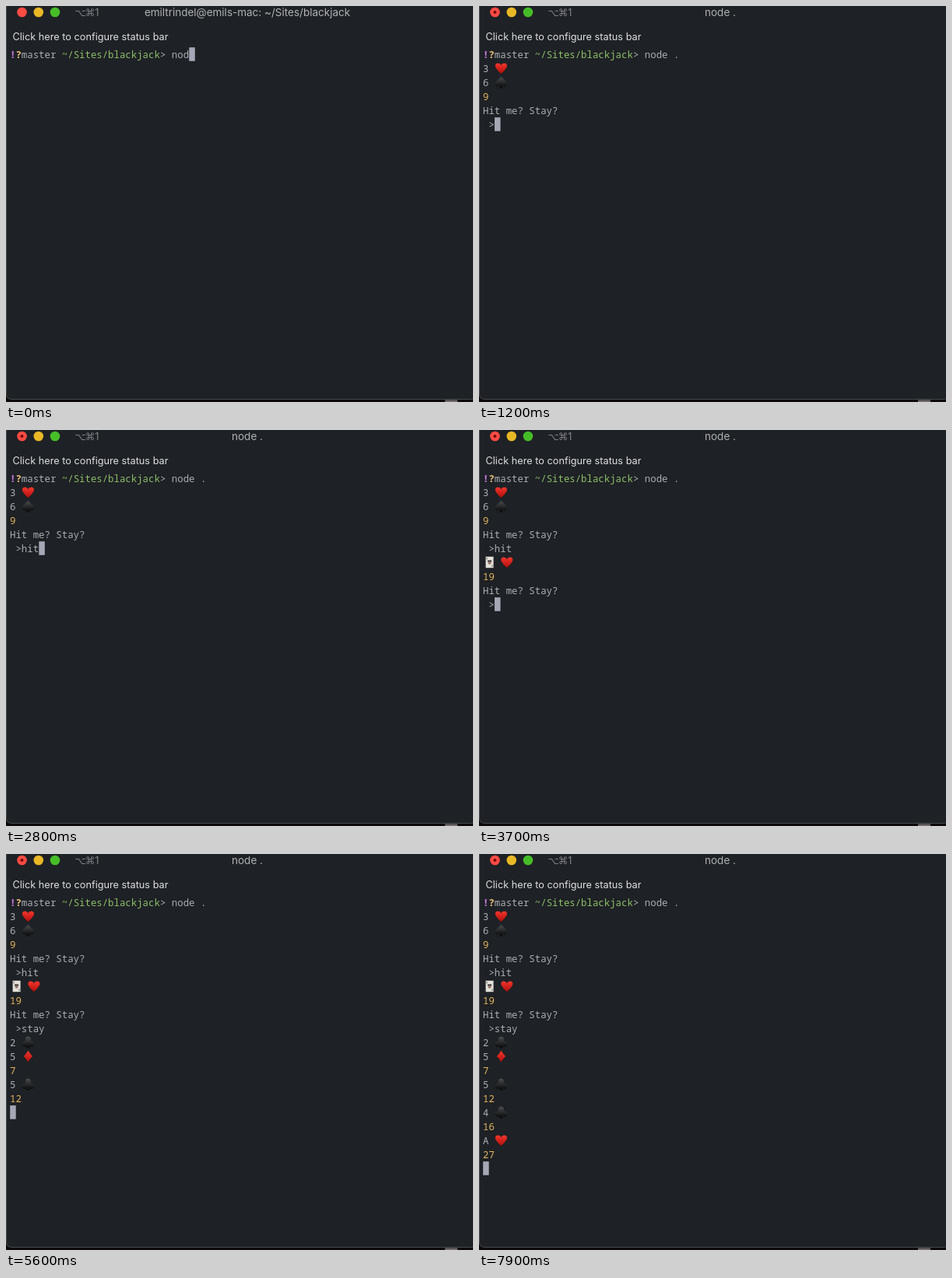
Write an HTML page with a canvas that moves like this. It is 600 by 509 pixels and loops after 8 s.

```html
<!DOCTYPE html>
<html lang="en">
<head>
<meta charset="utf-8">
<title>Terminal card game</title>
<style>
html, body { margin: 0; width: 100%; height: 100%; overflow: hidden; background: #0d090b; }
canvas { display: block; }
</style>
</head>
<body>
<canvas width="600" height="509"></canvas>
<script>
const ctx = document.querySelector('canvas').getContext('2d');
const LOOP = 8000, LEFT = 5, TOP = 53, ROW = 18, CELL = 7.422;
const MONO = '12.37px "Noto Sans Mono", "DejaVu Sans Mono", monospace';
const SANS = 'Inter, "Open Sans", sans-serif';
const GREY = '#abafb7', YELLOW = '#e2b65f';

// Prompt pieces: text, colour, weight
const prompt = [
  ['!', '#c678dd', 'bold '], ['?', '#e5c07b', 'bold '], ['master ', GREY, ''],
  ['~/Sites/blackjack', '#8fbf6b', ''], ['> ', GREY, '']
];
const promptLength = prompt.reduce((n, [text]) => n + text.length, 0);

// Everything typed or printed after the prompt
const ENTER = 500;
const output = [
  [0, 'nod'], [100, 'e'], [200, ' '], [300, '.'], [ENTER, '\n'],
  [600, '3 ♥\n6 ♠\n9\nHit me? Stay?\n >'],
  [1600, 'h'], [1700, 'i'], [1800, 't'],
  [2900, '\n🃏 ♥\n19\nHit me? Stay?\n >'],
  [3800, 's'], [4000, 't'], [4100, 'a'], [4200, 'y'],
  [4500, '\n2 ♣\n5 ♦\n7\n'],
  [5600, '5 ♣\n12\n'], [6600, '4 ♣\n16\n'], [7600, 'A ♥\n27\n']
];

const red = ['#f5382f', '#b00d0b'], black = ['#4a4b4d', '#08090a'];
const suits = {
  '♥': [red, 'M0 7C-3 4.5-7.6-.5-7.6-3C-7.6-7.4-1.5-7.4 0-3.6C1.5-7.4 7.6-7.4 7.6-3C7.6-.5 3 4.5 0 7Z'],
  '♦': [red, 'M0-7.2Q2.5-3 5.7 0Q2.5 3 0 7.2Q-2.5 3-5.7 0Q-2.5-3 0-7.2Z'],
  '♠': [black, 'M0-7.5C2-4.5 8-1 8 2.5C8 6 3.5 6.5 1 4L2.5 7.5H-2.5L-1 4C-3.5 6.5-8 6-8 2.5C-8-1-2-4.5 0-7.5Z'],
  '♣': [black, 'M3.7-3.7A3.7 3.7 0 1 0-2.8-1.3A3.8 3.8 0 1 0-1 4.6L-2.5 7.5H2.5L1 4.6A3.8 3.8 0 1 0 2.8-1.3A3.7 3.7 0 0 0 3.7-3.7Z']
};

function rect(color, x, y, w, h) {
  ctx.fillStyle = color;
  ctx.fillRect(x, y, w, h);
}

function text(str, x, y, color, font, align = 'left') {
  ctx.fillStyle = color;
  ctx.font = font;
  ctx.textAlign = align;
  ctx.fillText(str, x, y);
}

function disc(x, y, r, color) {
  ctx.fillStyle = color;
  ctx.beginPath();
  ctx.arc(x, y, r, 0, 7);
  ctx.fill();
}

function joker() {
  rect('#e4e1da', -5, -7.2, 10, 14.4);
  rect('#6b6a6a', -4, -6, 1, 2.5);
  rect('#6b6a6a', 3, 3.5, 1, 2.5);
  rect('#2c282b', -2.5, -2.5, 5, 2);
  disc(0, .8, 2, '#8d7466');
}

function emoji(char, x, y) {
  ctx.save();
  ctx.translate(x, y);
  if (char === '🃏') joker();
  else {
    const [[from, to], path] = suits[char];
    const fill = ctx.createLinearGradient(0, -7, 0, 7);
    fill.addColorStop(0, from);
    fill.addColorStop(1, to);
    ctx.fillStyle = fill;
    ctx.fill(new Path2D(path));
  }
  ctx.restore();
}

function drawWindow(running) {
  rect('#0d090b', 0, 0, 600, 509);
  rect('#6f6a6c', 564, 506.5, 16, 2.5);
  ctx.beginPath();
  ctx.roundRect(.5, -10, 603, 515.5, 6);
  ctx.fillStyle = '#1e2125';
  ctx.fill();
  ctx.strokeStyle = '#484b4f';
  ctx.lineWidth = 1;
  ctx.stroke();

  disc(20.5, 8, 6.3, '#fc4b43');
  if (running) disc(20.5, 8, 2, '#6d0b08');
  disc(41.8, 8, 6.3, '#e9b826');
  disc(63, 8, 6.3, '#46bd28');

  const keys = '12.5px "DejaVu Sans", sans-serif', dim = '#808286';
  text('⌥', 88.5, 13, dim, keys);
  text('⌘', 102, 13, dim, keys);
  text('1', 114, 13, dim, '13.5px ' + SANS);
  const title = running ? 'node .' : 'emiltrindel@emils-mac: ~/Sites/blackjack';
  text(title, 310, 13.2, '#b0b2b4', '13.5px ' + SANS, 'center');
  text('Click here to configure status bar', 8.5, 44.3, '#dedfe0', '12.72px ' + SANS);
}

function drawLine(line, row, col) {
  const y = TOP + row * ROW;
  let plain = '';
  for (const char of line) {
    const wide = char === '🃏' || char in suits;
    if (wide) emoji(char, LEFT + plain.length * CELL + 8.6, y + 9);
    plain += wide ? '  ' : char;
  }
  const color = /^\d+$/.test(line) ? YELLOW : GREY;
  text(plain, LEFT + col * CELL, y + 13.5, color, MONO);
  return col + plain.length;
}

function draw(t) {
  drawWindow(t >= ENTER);
  let col = 0;
  for (const [str, color, weight] of prompt) {
    text(str, LEFT + col * CELL, TOP + 13.5, color, weight + MONO);
    col += str.length;
  }
  const lines = output.filter(([at]) => at <= t).map(([, str]) => str).join('').split('\n');
  lines.forEach((line, row) => { col = drawLine(line, row, row ? 0 : promptLength); });
  rect('#a5a8b5', LEFT + col * CELL + .2, TOP + (lines.length - 1) * ROW + .2, 7.5, ROW - .4);
}

function frame() {
  draw(performance.now() % LOOP);
  requestAnimationFrame(frame);
}
frame();
</script>
</body>
</html>
```
